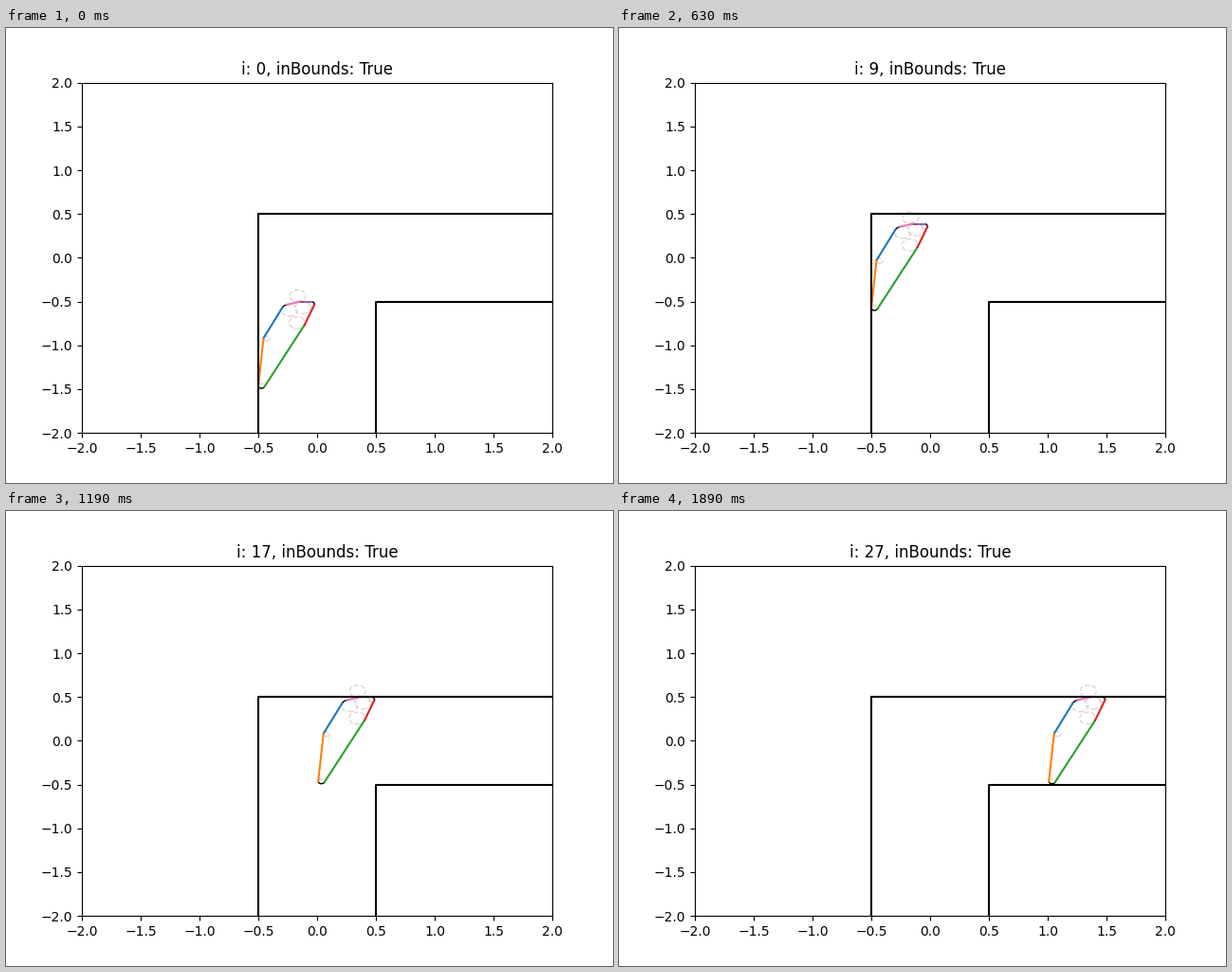
Recreate the animation shown at these times as a matplotlib script. Size 640 px wide and 480 px high, loop 1.96 s.

```python
import numpy as np
import matplotlib.pyplot as plt
from matplotlib.animation import FuncAnimation
from matplotlib.patches import Circle
from matplotlib.transforms import Affine2D

FRAMES, STEP_MS = 28, 70
BIG, SMALL = 0.068, 0.027
LEFT, TOP, BOTTOM = -0.5, -0.502, -1.49

# Corner circles, counterclockwise: x, y, signed radius (negative = concave)
CORNERS = np.array([
    (-0.235, -0.6, BIG),
    (-0.429, -0.924, SMALL),
    (LEFT + SMALL, BOTTOM + SMALL, SMALL),
    (-0.17, -0.742, BIG),
    (-0.049, TOP - SMALL, SMALL),
    (-0.12, TOP - BIG, BIG),
    (-0.165, TOP + BIG, -BIG),
])


def tangent(a, b):
    """Contact points and normal angle of the outer tangent from a to b."""
    d = b[:2] - a[:2]
    length = np.hypot(*d)
    along = d / length
    right = np.array([along[1], -along[0]])
    s = (a[2] - b[2]) / length
    n = np.sqrt(1 - s * s) * right + s * along
    return a[:2] + a[2] * n, b[:2] + b[2] * n, np.arctan2(n[1], n[0])


def offset(i):
    """Slide up through the corridor, then along it to the right."""
    dy = np.clip((i - 1) / 9, 0, 1)
    dx = 0.1 * (i - 12) + 0.01 if i >= 12 else 0
    return dx, dy


fig, ax = plt.subplots(figsize=(6.4, 4.8), dpi=100)
shift = Affine2D()
moving = shift + ax.transData

edges = [tangent(a, b) for a, b in zip(CORNERS, np.roll(CORNERS, -1, axis=0))]
for k, (x, y, r) in enumerate(CORNERS):
    ax.add_patch(Circle((x, y), abs(r), fill=False, ec="#e0d5d8", ls="--",
                        lw=1, transform=moving))
    start, end = edges[k - 1][2], edges[k][2]
    turn = (end - start + np.pi) % (2 * np.pi) - np.pi
    t = np.linspace(start, start + turn, 24)
    ax.plot(x + r * np.cos(t), y + r * np.sin(t), "k", lw=1, zorder=1.5,
            transform=moving)

for k, (p, q, _) in enumerate(edges):
    ax.plot(*zip(p, q), f"C{k}", transform=moving)

for corner in (-0.5, 0.5):
    ax.plot([corner, corner, 2], [-2, -corner, -corner], "k")
ax.set(xlim=(-2, 2), ylim=(-2, 2))
title = ax.set_title("")


def update(i):
    shift.clear().translate(*offset(i))
    title.set_text(f"i: {i}, inBounds: True")
    return []


anim = FuncAnimation(fig, update, frames=FRAMES, interval=STEP_MS,
                     repeat=True, repeat_delay=0)
plt.show()
```
